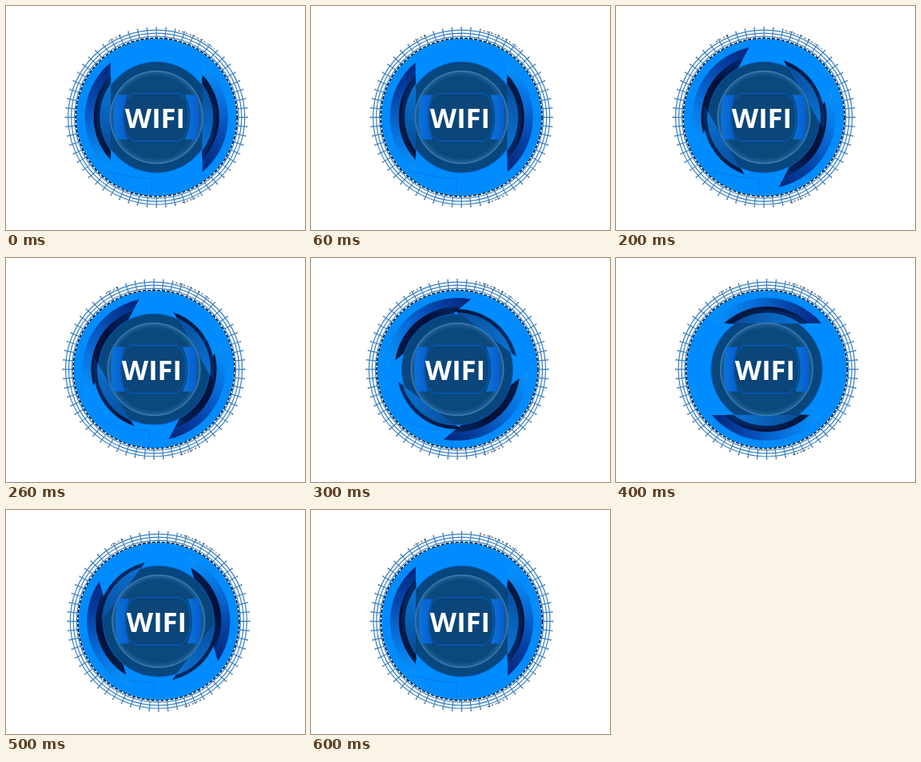
Animation, 374 px wide and 281 px high, one loop 700 ms. Source, as an HTML page:

```html
<!DOCTYPE html>
<html lang="en">
<head>
<meta charset="utf-8">
<title>WIFI dial</title>
<style>
html, body { margin: 0; width: 100%; height: 100%; overflow: hidden; background: #fff; }
svg { display: block; width: 100vw; height: 100vh; }
text { font: bold 34.5px "Open Sans", "Noto Sans", sans-serif; fill: #fff; text-anchor: middle; }
</style>
</head>
<body>
<svg viewBox="0 0 374 281">
  <defs>
    <linearGradient id="blade" gradientUnits="userSpaceOnUse" x1="-62" y1="-68" x2="-76" y2="68">
      <stop offset="0" stop-color="#04257c"/>
      <stop offset=".3" stop-color="#0544a6"/>
      <stop offset=".62" stop-color="#086cd8"/>
      <stop offset="1" stop-color="#0896ff"/>
    </linearGradient>
    <linearGradient id="shade" gradientUnits="userSpaceOnUse" x1="0" y1="-53" x2="0" y2="53">
      <stop offset="0" stop-color="#042868"/>
      <stop offset=".4" stop-color="#021038"/>
      <stop offset="1" stop-color="#031c48"/>
    </linearGradient>
    <linearGradient id="slot" gradientUnits="userSpaceOnUse" x1="0" y1="-50" x2="0" y2="50">
      <stop offset="0" stop-color="#032c68"/>
      <stop offset="1" stop-color="#02153c"/>
    </linearGradient>
    <linearGradient id="glow" gradientUnits="userSpaceOnUse" x1="0" y1="-44" x2="0" y2="44">
      <stop offset="0" stop-color="#0a74d4"/>
      <stop offset="1" stop-color="#084c98"/>
    </linearGradient>
    <linearGradient id="panel">
      <stop offset="0" stop-color="#0a74d8"/>
      <stop offset="1" stop-color="#075cd0"/>
    </linearGradient>
    <radialGradient id="lens">
      <stop offset=".88" stop-color="#0b497c"/>
      <stop offset=".96" stop-color="#1c5c93"/>
      <stop offset="1" stop-color="#4584b8"/>
    </radialGradient>
  </defs>
  <g id="dial">
    <g transform="scale(1 .99)" fill="none">
      <g id="grid" stroke="#377fc2" stroke-width="1.2"></g>
      <path id="tips" stroke="#48688c" stroke-width="1.6"/>
      <path id="specks" stroke="#000" stroke-dasharray="2 3"/>
    </g>
    <ellipse rx="100.7" ry="99.1" fill="none" stroke="#000" stroke-width="1.8" stroke-dasharray="4 2"/>
    <ellipse rx="100.4" ry="98.8" fill="#008cff"/>
    <path d="M-62 67Q-35 76-6 77V98" fill="none" stroke="#0877dc"/>
    <g id="outer"></g>
    <circle r="69.5" fill="#08467e" stroke="#075cc0"/>
    <g id="inner"></g>
    <circle r="58.5" fill="url(#lens)"/>
    <path d="M-51-28H-36Q-42-16-42 0T-36 28H-51Q-57 0-51-28Z" fill="url(#panel)"/>
    <path d="M50-28H36Q42-16 42 0T36 28H50Q57 0 50-28Z" fill="url(#panel)"/>
    <path d="M-29-30H28L37-21Q43 0 37 21L28 30H-29L-38 21Q-44 0-38-21Z" fill="#0b467a" stroke="#0660d0"/>
  </g>
  <text id="label" y="152.6">WIFI</text>
</svg>
<script>
const byId = id => document.getElementById(id);
const STEP = 100;
// Centre x, outer turn, inner turn, horizontal and vertical scale, label x
const poses = [
  [188.2, 0, 0, 1, 1, 186.4],
  [188.4, 12, -19, 1.085, 1.045, 182.4],
  [185, 28, -30, 1, 1, 182.4],
  [183, 51, -53, 1, 1, 180.4],
  [188.5, 90, -90, 1, 1, 186.4],
  [190.8, 164, -144, 1, 1, 188.4],
  [188.5, 180, -180, 1, 1, 186.4]
];

const polar = (r, deg) => {
  const a = deg * Math.PI / 180;
  return (r * Math.cos(a)).toFixed(2) + " " + (r * Math.sin(a)).toFixed(2);
};
const arc = (r, from, to) => `M${polar(r, from)}A${r} ${r} 0 0 1 ${polar(r, to)}`;

function segmentPair(r, distance, fill) {
  const half = Math.acos(distance / r) * 180 / Math.PI;
  const path = `<path d="${arc(r, 180 - half, 180 + half)}Z" fill="url(#${fill})"/>`;
  return path + `<g transform="rotate(180)">${path}</g>`;
}

function spokes(from, to) {
  let path = "";
  for (let deg = 0; deg < 360; deg += 6) path += `M${polar(from, deg)}L${polar(to, deg)}`;
  return path;
}

function build() {
  const rings = [102.5, 106.5, 110.5].map(r => `<circle r="${r}"/>`).join("");
  byId("grid").innerHTML = rings + `<path d="${spokes(101, 113)}"/>`;
  byId("tips").setAttribute("d", spokes(113, 114.5));
  byId("specks").setAttribute("d", arc(113, -76, -50) + arc(113, 62, 74) + arc(113, -122, -112));
  byId("outer").innerHTML = segmentPair(89.5, 57.5, "blade") + segmentPair(78.5, 57.5, "shade");
  byId("inner").innerHTML = segmentPair(75.5, 57, "slot") + segmentPair(71, 57, "glow");
}

function draw(now) {
  const [cx, outerTurn, innerTurn, sx, sy, labelX] = poses[Math.floor(now / STEP) % poses.length];
  byId("dial").setAttribute("transform", `translate(${cx} 139.6) scale(${sx} ${sy})`);
  byId("outer").setAttribute("transform", `rotate(${outerTurn})`);
  byId("inner").setAttribute("transform", `rotate(${innerTurn})`);
  byId("label").setAttribute("x", labelX);
}

build();
draw(0);
const start = performance.now();
(function tick() {
  draw(performance.now() - start);
  requestAnimationFrame(tick);
})();
</script>
</body>
</html>
```
